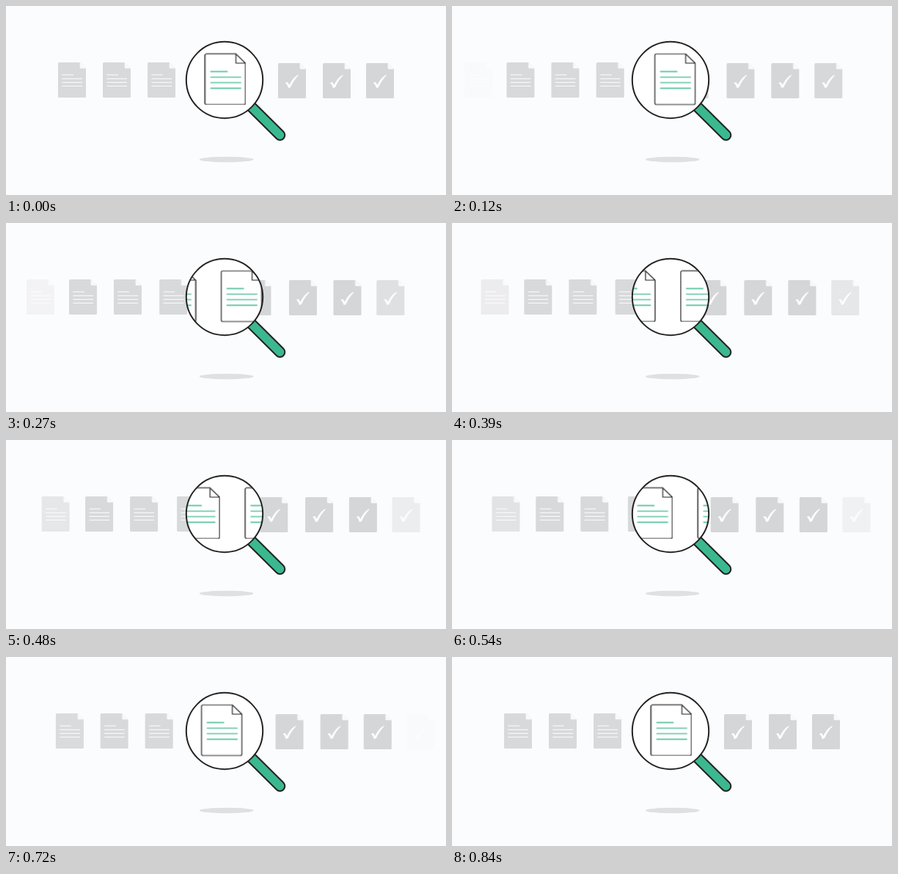
An HTML page that plays this animation: 600 px wide and 258 px high, repeating every 0.9 s.

```html
<!DOCTYPE html>
<html lang="en">
<head>
<meta charset="utf-8">
<title>Document review</title>
<style>
  html, body { margin: 0; width: 100%; height: 100%; overflow: hidden; background: #fbfcfe; }
  svg { display: block; width: 600px; height: 258px; }

  /* --x: start position, --d: distance travelled in one loop */
  .move { animation: slide 900ms infinite; transform: translate(var(--x), var(--y)); }
  .in { animation-name: slide, appear; }
  .out { animation-name: slide, vanish; }
  .todo { --y: 77px; }
  .done { --y: 78px; }
  .page { --y: 65.5px; }

  @keyframes slide {
    0% { transform: translate(var(--x), var(--y)); animation-timing-function: cubic-bezier(.3333, 0, .6667, 1); }
    93.333%, 100% { transform: translate(calc(var(--x) + var(--d)), var(--y)); }
  }
  @keyframes appear {
    0% { opacity: 0; animation-timing-function: cubic-bezier(.3333, 0, .6667, 1); }
    93.333%, 100% { opacity: 1; }
  }
  @keyframes vanish {
    0% { opacity: 1; animation-timing-function: cubic-bezier(.3333, 0, .6667, 1); }
    93.333%, 100% { opacity: 0; }
  }
</style>
</head>
<body>
<svg viewBox="0 0 600 258" xmlns="http://www.w3.org/2000/svg">
  <defs>
    <clipPath id="glass"><circle cx="298" cy="101" r="52.2"/></clipPath>

    <g id="sheet">
      <path d="M1.5 0H29.7L38 8.3V46.5Q38 48 36.5 48H1.5Q0 48 0 46.5V1.5Q0 0 1.5 0Z"/>
      <path d="M29.7 0V7Q29.7 8.3 31 8.3H38Z" fill="#f8f9fa"/>
    </g>

    <g id="todo">
      <use href="#sheet" fill="#d8d9db"/>
      <path d="M5.3 17H21M5.3 22.2H33M5.3 27.2H33M5.3 32.2H33" stroke="#fff" stroke-width="1.1"/>
    </g>

    <g id="done">
      <use href="#sheet" fill="#d5d6d8"/>
      <path d="M10 27.2Q12.2 25.3 13.4 26.6Q14.6 28 15.2 30Q19.5 21.5 25.3 17Q26.6 16.2 28 16.4Q21 23.5 17.2 32.4Q16 34.2 13.8 33.8Q12.8 28.8 10 27.2Z" fill="#fff"/>
    </g>

    <g id="page" fill="none">
      <path d="M2 0H42L55 12.5V67Q55 69 53 69H2Q0 69 0 67V2Q0 0 2 0ZM42 0V12.5H55" fill="#fff" stroke="#222" stroke-width="1.2" stroke-linejoin="round"/>
      <path d="M7.2 24H30.8M7.2 31.6H49.2M7.2 39.1H49.2M7.2 46.7H49.2" stroke="#3cb88f" stroke-width="1.4"/>
    </g>
  </defs>

  <rect width="600" height="258" fill="#fbfcfe"/>
  <ellipse cx="300.7" cy="209.5" rx="37" ry="3.7" fill="#dfe0e2"/>

  <use href="#todo" class="move todo in" style="--x:14px;--d:57px"/>
  <use href="#todo" class="move todo" style="--x:71px;--d:61px"/>
  <use href="#todo" class="move todo" style="--x:132px;--d:61px"/>
  <use href="#todo" class="move todo" style="--x:193px;--d:66px"/>

  <use href="#done" class="move done" style="--x:308px;--d:63px"/>
  <use href="#done" class="move done" style="--x:371px;--d:61px"/>
  <use href="#done" class="move done" style="--x:432px;--d:59px"/>
  <use href="#done" class="move done out" style="--x:491px;--d:58.5px"/>

  <g stroke-linecap="round">
    <path d="M330 133L373.6 176.3" stroke="#222" stroke-width="15.4"/>
    <path d="M330 133L373.6 176.3" stroke="#3cb88f" stroke-width="11.4"/>
  </g>
  <circle cx="298" cy="101" r="52.2" fill="#fff"/>
  <g clip-path="url(#glass)">
    <use href="#page" class="move page" style="--x:181.5px;--d:90px"/>
    <use href="#page" class="move page" style="--x:271.5px;--d:90px"/>
  </g>
  <circle cx="298" cy="101" r="52.2" fill="none" stroke="#222" stroke-width="2"/>
</svg>
</body>
</html>
```
